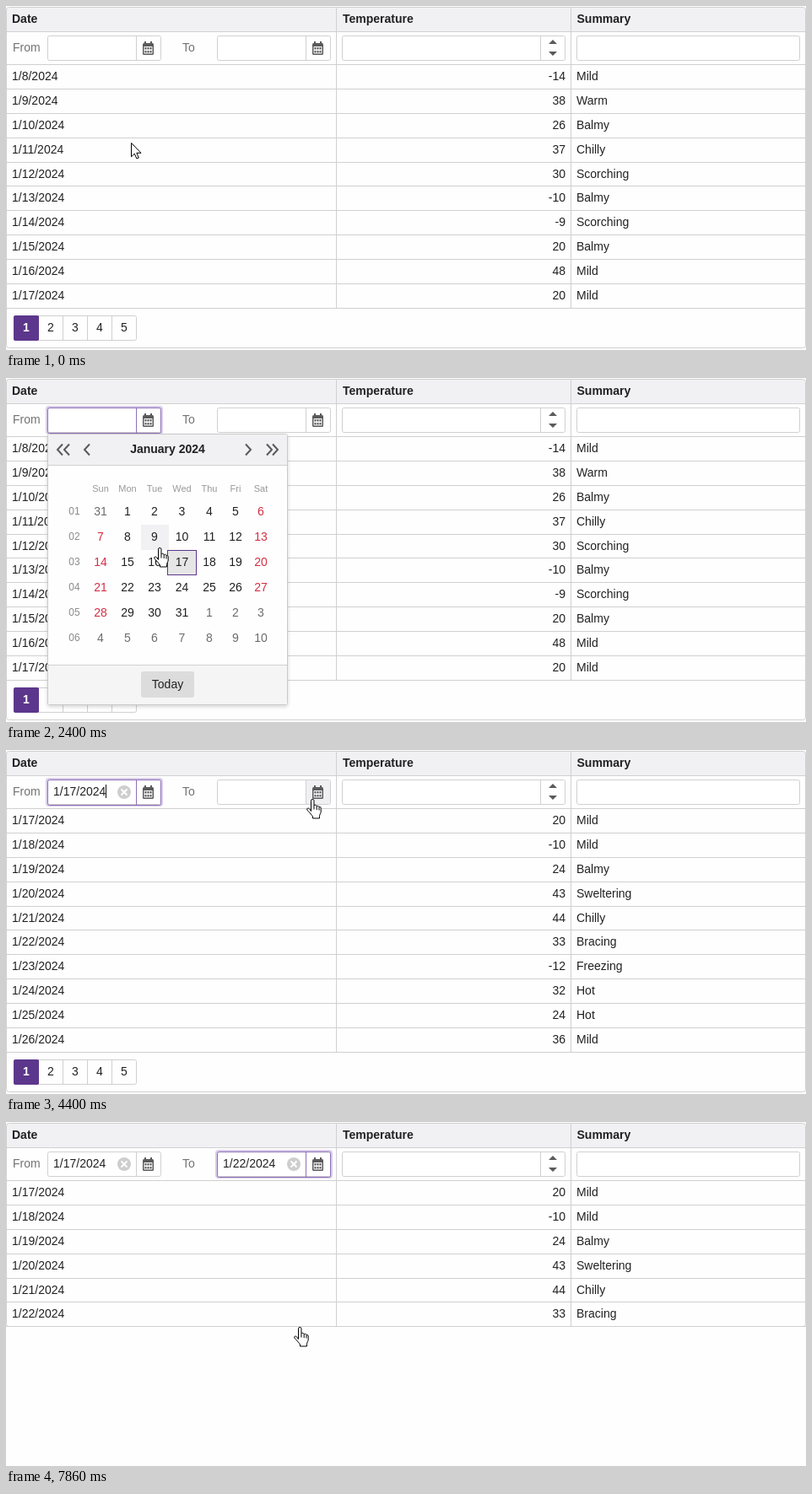
Recreate the animation shown at these times as an HTML page. Size 948 by 408 pixels, loop 8200 ms.

```html
<!DOCTYPE html>
<html lang="en">
<head>
<meta charset="utf-8">
<title>Date range filter</title>
<style>
  html, body { margin: 0; width: 100%; height: 100%; overflow: hidden; background: #fefefe; }
  svg { display: block; width: 948px; height: 408px; }
  text { font: 14px "Liberation Sans", Arial, sans-serif; fill: #212121; white-space: pre; }
  .bold { font-weight: bold; }
  .label { fill: #727272; }
  .end { text-anchor: end; }
  .mid { text-anchor: middle; }
  .week { font-size: 12px; fill: #8b8b8b; }
  .weekday { font-size: 11px; fill: #999; }
  .other { fill: #6c6c6c; }
  .weekend { fill: #d32f45; }
  .off { opacity: .55; }
  .icon { fill: #5a5a5a; }
  .chev { fill: none; stroke: #5a5a5a; stroke-width: 2; }
  .popup { filter: drop-shadow(0 2px 2px rgba(0, 0, 0, .16)); }
  .pointer path { fill: #fff; stroke: #000; stroke-linejoin: round; }
</style>
</head>
<body>
<svg id="stage" viewBox="0 0 948 408"></svg>
<script>
const LOOP = 8200;
const LINE = '#d0d0d0', PURPLE = '#5c368c', HEAD = '#f1f1f4';
const SHIFT = 201; // distance between the two date boxes

const rect = (x, y, w, h, fill, attrs = '') =>
  `<rect x="${x}" y="${y}" width="${w}" height="${h}" fill="${fill}" ${attrs}/>`;
const frame = (x, y, w, h, stroke = LINE, fill = 'none', r = 2) =>
  rect(x + .5, y + .5, w - 1, h - 1, fill, `stroke="${stroke}" rx="${r}"`);
const text = (x, y, s, cls = '') => `<text x="${x}" y="${y}" class="${cls}">${s}</text>`;
// "on" lists the spans of the loop in which a part is visible
const when = (on, body) => `<g data-on="${on}">${body}</g>`;
const path = (d, cls, attrs = '') => `<path d="${d}" class="${cls}" ${attrs}/>`;

const rowLine = i => Math.round(68.95 + 28.9 * i);

function rows(first, temps, words) {
  return words.split(' ').map((word, i) => {
    const y = rowLine(i) + 19;
    return text(7, y, `1/${first + i}/2024`) + text(663, y, temps[i], 'end') + text(676, y, word);
  }).join('');
}

function grid(count, bottom) {
  let out = frame(0, 1, 948, bottom, LINE, 'none', 3);
  for (const x of [391, 669]) out += rect(x, 2, 1, rowLine(count) - 2, LINE);
  for (let i = 0; i <= count; i++) out += rect(0, rowLine(i), 948, 1, LINE);
  return out;
}

function pager() {
  let out = frame(9, 367, 146, 30) + rect(9, 367, 30, 30, PURPLE, 'rx="2"');
  for (let i = 0; i < 5; i++) {
    if (i) out += rect(9 + 29 * i, 368, 1, 28, i > 1 ? LINE : PURPLE);
    out += `<g ${i ? '' : 'style="font-weight:bold"'}>` +
      `<text x="${24 + 29 * i}" y="386" class="mid ${i ? '' : 'bold'}" ${i ? '' : 'style="fill:#fff"'}>${i + 1}</text></g>`;
  }
  return out;
}

function calendarIcon(x) {
  let out = rect(x, 44, 13, 14, '#5a5a5a', 'rx="1.5"') + rect(x + 2, 42, 2, 3, '#5a5a5a') +
    rect(x + 9, 42, 2, 3, '#5a5a5a') + rect(x + 1.5, 48, 10, 8.5, '#fff');
  for (let i = 0; i < 6; i++)
    out += rect(x + 2.5 + 3 * (i % 3), 49 + 4 * Math.floor(i / 3), 2, 2.5, '#5a5a5a');
  return out;
}

function dateBox(dx, value, focus, filled, caret) {
  const ring = rect(dx + 48, 34, 137, 32, 'none', 'stroke="#d8cce8" stroke-width="2" rx="3"') +
    frame(dx + 49, 35, 135, 31, '#8e6fb8') + rect(dx + 154, 36, 1, 29, '#8e6fb8');
  const clear = `<circle cx="${dx + 140}" cy="50" r="8" fill="#cecece"/>` +
    path(`M${dx + 136.5} 46.5l7 7m0-7l-7 7`, '', 'stroke="#fff" stroke-width="2"');
  return frame(dx + 49, 35, 135, 30, LINE, '#fff') + rect(dx + 154, 36, 1, 28, LINE) +
    rect(dx + 155, 36, 28, 28, '#f0f0f3', `class="iconHover" data-dx="${dx}"`) +
    when(focus, ring) + calendarIcon(dx + 162) +
    when(filled, text(dx + 56, 54, value) + clear) + caret;
}

const caret = (x, y, on) => when(on, rect(x, y, 1, 16, '#111'));

const EDGES = [95, 128, 160, 192, 225, 257, 287, 317];
const MIDS = [112, 144, 176, 208.5, 241, 272, 302];

function popup(dx, firstDay, on) {
  const dim = firstDay > 1 ? 'off' : '';
  const chev = (x, step, cls = '') => path(`M${x} 78.5l${step} 6.5l${-step} 6.5`, 'chev ' + cls);
  let out = `<g class="popup">${frame(49, 66, 285, 322, '#cacaca', '#fefefe')}</g>` +
    rect(50, 67, 283, 36, HEAD) + rect(50, 103, 283, 1, LINE) +
    rect(50, 340, 283, 47, '#f5f5f5') + rect(50, 340, 283, 1, LINE) +
    [67, 75, 99].map(x => chev(x, -6, dim)).join('') + [284, 309, 316].map(x => chev(x, 6)).join('') +
    text(191.5, 89, 'January 2024', 'bold mid title') +
    rect(160, 348, 63, 31, '#dcdcdc', 'rx="3" class="today"') + text(191.5, 368, 'Today', 'mid') +
    rect(0, 0, 0, 30, '#f1f1f4', 'class="cell"') +
    frame(191, 204, 35, 30, PURPLE, '#e6e6e6', 0);
  'Sun Mon Tue Wed Thu Fri Sat'.split(' ').forEach((d, i) => out += text(MIDS[i], 135, d, 'mid weekday'));
  for (let r = 0; r < 6; r++) {
    const y = 163 + 30 * r;
    out += text(81, y - 1, '0' + (r + 1), 'mid week');
    for (let c = 0; c < 7; c++) {
      const day = 7 * r + c;
      const inside = day > 0 && day < 32;
      let cls = 'mid ';
      if (!inside) cls += 'other ';
      else if (c % 6 === 0) cls += 'weekend ';
      if (day < firstDay && firstDay > 1) cls += 'off';
      out += text(MIDS[c], y, inside ? day : (day || 62) - 31, cls);
    }
  }
  return when(on, `<g class="calendar" data-dx="${dx}" data-min="${firstDay}" transform="translate(${dx})">${out}</g>`);
}

const HAND = 'M5.5 14.5V2.2a1.75 1.75 0 0 1 3.5 0V8c.4-1.2 3-1 3.2.8c.5-1 2.6-.7 2.8.9c.6-.8 2.2-.3 2.2 1.3' +
  'V15c0 2-1.7 3.5-1.7 5.5V23H7.5v-2C7 19.5 2 14.5.8 13C0 11.5 2 10.2 3.4 11.6Z';
const pointers = {
  arrow: path('M.5.5V16.8L4.3 13.2L6.9 19L9.3 18L6.8 12.3H12Z', ''),
  hand: `<g transform="translate(-5)">${path(HAND, '')}${path('M9 8v4.5M12.2 9v4M15 10v3.5', '')}</g>`,
  beam: path('M-3-8.5h2.5l.5.5l.5-.5H3M0-8V8M-3 8.5h2.5l.5-.5l.5.5H3', '', 'style="fill:none"')
};

const stage = document.getElementById('stage');
stage.innerHTML = rect(0, 0, 948, 408, '#fefefe') + rect(1, 2, 946, 28, HEAD) + rect(0, 30, 948, 1, LINE) +
  when('0-6300', grid(10, 405) + pager()) + when('6300-8200', grid(6, 242)) +
  text(7, 20, 'Date', 'bold') + text(399, 20, 'Temperature', 'bold') + text(676.5, 20, 'Summary', 'bold') +
  text(8, 54, 'From', 'label') + text(209, 54, 'To', 'label') +
  when('0-3260', rows(8, [-14, 38, 26, 37, 30, -10, -9, 20, 48, 20],
    'Mild Warm Balmy Chilly Scorching Balmy Scorching Balmy Mild Mild')) +
  when('3260-8200', rows(17, [20, -10, 24, 43, 44, 33], 'Mild Mild Balmy Sweltering Chilly Bracing')) +
  when('3260-6300', `<g transform="translate(0 ${rowLine(6) - 69})">${rows(23, [-12, 32, 24, 36], 'Freezing Hot Hot Mild')}</g>`) +
  dateBox(0, '1/17/2024', '1700-3000 3230-4700', '3230-8200',
    caret(56, 42, '1700-2230 2760-3000') + caret(118, 41, '3230-3790 4320-4700')) +
  dateBox(SHIFT, '1/22/2024', '4700-6130 6300-8200', '6300-8200',
    caret(257, 42, '4700-5230 5760-6130') + caret(319, 41, '6300-6830 7360-7860')) +
  frame(398, 35, 265, 30, LINE, '#fff') + rect(633, 36, 1, 28, LINE) +
  path('M643 45l5-5l5 5zM643 54l5 5l5-5z', 'icon') +
  frame(676, 35, 265, 30, LINE, '#fff') +
  popup(0, 1, '1800-3230') + popup(SHIFT, 17, '4730-6300') +
  Object.keys(pointers).map(k => `<g class="pointer" id="${k}">${pointers[k]}</g>`).join('');

const timed = [...stage.querySelectorAll('[data-on]')].map(el => ({
  el, spans: el.dataset.on.split(' ').map(s => s.split('-').map(Number))
}));
const calendars = [...stage.querySelectorAll('.calendar')];
const iconHovers = [...stage.querySelectorAll('.iconHover')];
const show = (el, on) => { el.style.display = on ? '' : 'none'; };

// pointer stops: time, x, y
const STOPS = [
  [0, 148, 162], [960, 148, 162], [1230, 149, 106], [1400, 151, 56], [1500, 166, 57],
  [2060, 166, 57], [2410, 180, 205], [2730, 190, 352], [3530, 190, 352], [3700, 206, 300],
  [4020, 282, 158], [4330, 354, 53], [4460, 364, 62], [5060, 364, 62], [5200, 361, 76],
  [5530, 352, 160], [5860, 347, 235], [5960, 346, 243], [LOOP, 346, 243]
];
const slope = (i, k) => STOPS[i + 1] && STOPS[i]
  ? (STOPS[i + 1][k] - STOPS[i][k]) / (STOPS[i + 1][0] - STOPS[i][0]) : 0;
function tangent(i, k) {
  const a = slope(i - 1, k), b = slope(i, k);
  return a * b > 0 ? 2 * a * b / (a + b) : 0;
}
// monotone cubic through the stops
function along(t, k) {
  let i = 0;
  while (i < STOPS.length - 2 && t >= STOPS[i + 1][0]) i++;
  const [p, q] = [STOPS[i], STOPS[i + 1]];
  const h = q[0] - p[0], u = (t - p[0]) / h, e = u * u * (3 - 2 * u);
  return p[k] + (q[k] - p[k]) * e +
    h * u * (1 - u) * ((1 - u) * tangent(i, k) - u * tangent(i + 1, k));
}

const between = (v, a, b) => v >= a && v < b;

function pointerKind(t, x, y) {
  const dx = x > 220 ? SHIFT : 0;
  if (between(y, 35, 66)) {
    if (between(x - dx, 49, 155)) return 'beam';
    if (between(x - dx, 155, 185)) return 'hand';
  }
  const open = between(t, 1800, 3530) || t >= 4730;
  return open && (between(y, 70, 100) || between(y, 143, 323) || between(y, 348, 379)) ? 'hand' : 'arrow';
}

function hover(cal, x, y) {
  const px = x - cal.dataset.dx;
  const onTitle = between(y, 78, 98) && between(px, 147, 237);
  cal.querySelector('.title').style.fill = onTitle ? PURPLE : '';
  cal.querySelector('.today').setAttribute('fill', between(y, 348, 379) && between(px, 160, 223) ? '#cbd1db' : '#dcdcdc');
  const col = EDGES.findIndex((e, i) => between(px, e, EDGES[i + 1]));
  const row = Math.floor((y - 143) / 30);
  const cell = cal.querySelector('.cell');
  const on = col >= 0 && between(row, 0, 6) && 7 * row + col >= cal.dataset.min;
  show(cell, on);
  if (on) {
    cell.setAttribute('x', EDGES[col]);
    cell.setAttribute('width', EDGES[col + 1] - EDGES[col] + 1);
    cell.setAttribute('y', 143 + 30 * row + 1);
  }
}

const start = performance.now();
function draw() {
  const t = (performance.now() - start) % LOOP;
  const x = Math.round(along(t, 1)), y = Math.round(along(t, 2));
  for (const { el, spans } of timed) show(el, spans.some(([a, b]) => between(t, a, b)));
  for (const el of iconHovers) show(el, between(y, 35, 66) && between(x - el.dataset.dx, 155, 185));
  for (const cal of calendars) hover(cal, x, y);
  const kind = pointerKind(t, x, y);
  for (const k in pointers) {
    const el = document.getElementById(k);
    show(el, k === kind);
    el.setAttribute('transform', `translate(${x} ${y})`);
  }
  requestAnimationFrame(draw);
}
draw();
</script>
</body>
</html>
```
